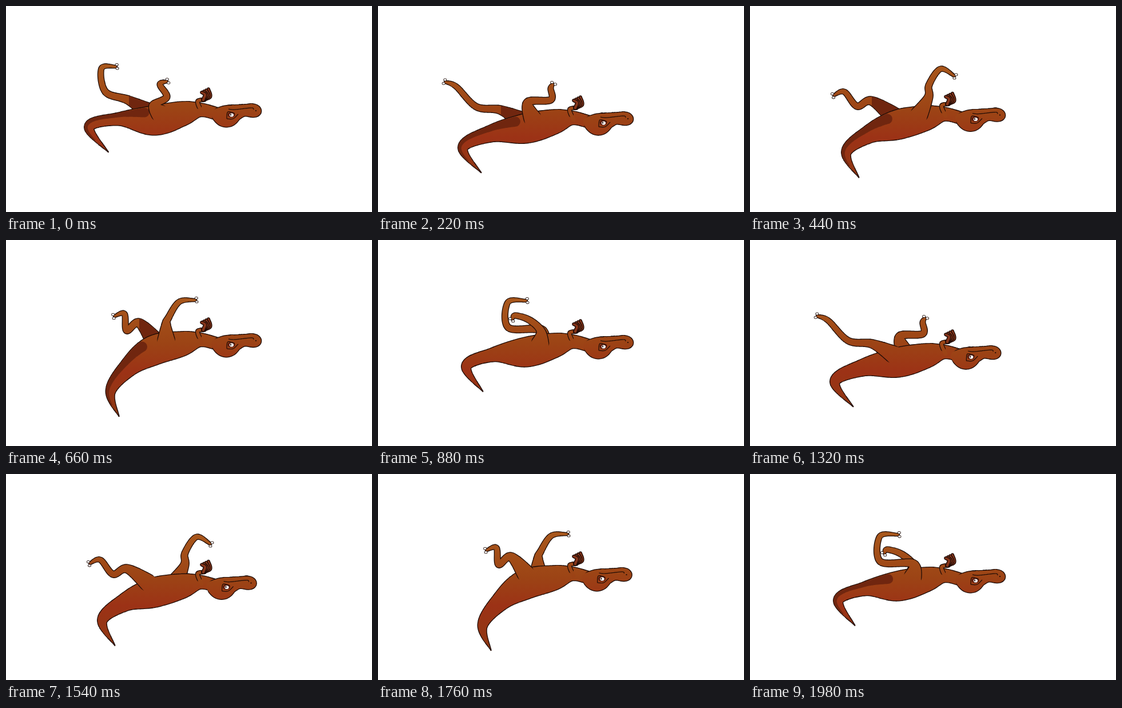
An HTML page with a canvas for the animation above (2.2 s loop, 640 px wide and 360 px high).

```html
<!DOCTYPE html>
<html lang="en">
<head>
<meta charset="utf-8">
<title>Running dinosaur</title>
<style>
html, body { margin: 0; width: 100%; height: 100%; overflow: hidden; background: #fff; }
canvas { display: block; }
</style>
</head>
<body>
<canvas id="stage" width="640" height="360"></canvas>
<script>
const ctx = document.getElementById('stage').getContext('2d');
const STEP = 220, COUNT = 10, HALF = COUNT / 2, DETAIL = 24;
const INK = '#1d0b06', SHADE = '#70260f', HAND = '#86351a';

const skin = ctx.createLinearGradient(0, 100, 0, 300);
skin.addColorStop(0, '#a9581c');
skin.addColorStop(0.4, '#9c4415');
skin.addColorStop(0.65, '#9c3216');
skin.addColorStop(1, '#8f3813');

// Knee, hock, foot and toe over one stride; the far leg is half a cycle behind.
const stride = [
  [[258, 174], [281, 159], [269, 137], [281, 132]],
  [[262, 169], [302, 164], [302, 144], [306, 137]],
  [[312, 160], [313, 138], [333, 110], [357, 122]],
  [[280, 148], [284, 136], [303, 108], [331, 105]],
  [[285, 160], [265, 140], [240, 132], [235, 138]],
  [[215, 165], [174, 150], [167, 109], [192, 106]],
  [[215, 182], [172, 176], [137, 141], [118, 133]],
  [[213, 166], [187, 175], [165, 150], [147, 156]],
  [[233, 145], [211, 158], [207, 129], [190, 133]],
  [[285, 157], [228, 153], [227, 109], [259, 106]]
];
const LEG_RADII = [8, 6, 5, 2.5];

// Periodic motion that repeats with every footfall, twice per loop.
function beat(step, mean, c1, s1, c2, s2) {
  const a = step * 2 * Math.PI / HALF;
  return mean + c1 * Math.cos(a) + s1 * Math.sin(a) + c2 * Math.cos(2 * a) + s2 * Math.sin(2 * a);
}

// Catmull-Rom samples through [x, y, radius] keys.
function spline(keys) {
  const key = i => keys[Math.max(0, Math.min(keys.length - 1, i))];
  const total = (keys.length - 1) * DETAIL;
  return Array.from({ length: total + 1 }, (_, n) => {
    const i = Math.floor(n / DETAIL), t = n / DETAIL - i;
    const [a, b, c, d] = [key(i - 1), key(i), key(i + 1), key(i + 2)];
    return b.map((v, k) => v + t / 2 * (c[k] - a[k]
      + t * (2 * a[k] - 5 * v + 4 * c[k] - d[k] + t * (3 * (v - c[k]) + d[k] - a[k]))));
  });
}

function discs(samples, grow) {
  const path = new Path2D();
  for (const [x, y, r] of samples) {
    const radius = Math.max(0.3, r + grow);
    path.moveTo(x + radius, y);
    path.arc(x, y, radius, 0, 2 * Math.PI);
  }
  return path;
}

// A tapered limb; the first `open` samples blend into what lies below.
function limb(samples, fill = skin, open = 0) {
  const inside = discs(samples, -0.7);
  ctx.fillStyle = INK;
  ctx.fill(discs(samples.slice(open), 0.6));
  ctx.fillStyle = fill;
  ctx.fill(inside);
  return inside;
}

function spot(x, y, rx, ry, fill) {
  ctx.beginPath();
  ctx.ellipse(x, y, rx, ry, 0, 0, 2 * Math.PI);
  ctx.fillStyle = fill;
  ctx.fill();
}

function line(...keys) {
  ctx.beginPath();
  spline(keys).forEach(([x, y]) => ctx.lineTo(x, y));
  ctx.strokeStyle = INK;
  ctx.lineWidth = 1.2;
  ctx.stroke();
}

function drawLeg(joints, bob, open, shaded) {
  const [kneeX] = joints[0], [toeX, toeY] = joints[3];
  const hip = [275 + 0.3 * (kneeX - 262), 192 + bob, 18];
  const inside = limb(spline([hip, ...joints.map((p, i) => [...p, LEG_RADII[i]])]), skin, open);
  if (shaded) {
    ctx.save();
    ctx.clip(inside);
    ctx.fillStyle = SHADE;
    ctx.fillRect(kneeX, 0, 200, 360);
    ctx.restore();
  }
  const angle = Math.atan2(toeY - joints[2][1], toeX - joints[2][0]);
  for (const side of [-1, 1]) {
    const x = toeX + 4 * Math.cos(angle + side), y = toeY + 4 * Math.sin(angle + side);
    spot(x, y, 3, 2.5, INK);
    spot(x, y, 2.2, 1.7, '#fff');
  }
}

function drawBody(step, bob, shaded) {
  const bendX = beat(step, 160, -18.1, -5.7, 3.6, 4.1);
  const bendY = beat(step, 239.6, -25.9, 8.1, -2.7, 9.5);
  const hip = [258, 200 + bob, 26];
  const samples = spline([
    [bendX + 26 + (160 - bendX) / 2, bendY + 44, 0.6],
    [bendX, bendY, 9],
    [(bendX + hip[0]) / 2 - 4, (bendY + hip[1]) / 2 - 8, 13.5 + (bendY - 230) / 10],
    hip,
    [305, 189 + bob, 22],
    [338, 181.5 + bob, 12.5],
    [368, 188 + bob, 11]
  ]);
  limb(samples);
  if (!shaded) return;
  // The shadow hugs the outer side of the tail.
  const tail = samples.slice(DETAIL / 2, 3 * DETAIL - 6);
  const band = tail.slice(1).map(([x, y, r], i) => {
    const dx = x - tail[i][0], dy = y - tail[i][1], k = 0.6 * r / Math.hypot(dx, dy);
    return [x + dy * k, y - dx * k, 0.4 * r];
  });
  ctx.fillStyle = SHADE;
  ctx.fill(discs(band, -0.7));
}

function drawHead() {
  limb(spline([
    [368, 189, 10], [385, 193, 19], [400, 187, 14],
    [416, 182.5, 10.5], [434, 183, 11.5], [442, 185, 3]
  ]), skin, DETAIL / 2);
  spot(394, 190, 6.5, 5, '#5c1b0d');
  spot(394.5, 190.5, 3.6, 3.1, '#fff');
  spot(393, 190, 1, 1.8, INK);
  line([386, 197], [388, 185], [400, 188]);
  line([386, 197], [397, 197], [406, 189]);
  line([389, 180], [400, 181], [429, 178], [433, 181]);
  spot(437, 183, 1.2, 1, INK);
}

function drawArm() {
  limb(spline([[342, 185, 4], [335, 167, 3.5], [347, 164, 3]]), skin, DETAIL / 2);
  for (let i = 0; i < 4; i++) {
    limb(spline([[345, 164, 3], [357 - 3 * i, 158 - i, 2.8], [354 - 4 * i, 145 + 2 * i, 2.2]]), HAND);
  }
}

function shifted(dx, dy, drawPart) {
  ctx.save();
  ctx.translate(dx, dy);
  drawPart();
  ctx.restore();
}

function draw(step) {
  const bob = beat(step, 2.1, 1.1, 10.3, -3.2, -1.3);
  const tuck = 18 * Math.max(0, Math.cos(2 * Math.PI * (step - 6.6) / COUNT) - 0.5);
  const shaded = (step + 1) % COUNT < HALF;
  ctx.fillStyle = '#fff';
  ctx.fillRect(0, 0, 640, 360);
  drawLeg(stride[(step + HALF) % COUNT], bob, 0, shaded);
  drawBody(step, bob, shaded);
  drawLeg(stride[step], bob, DETAIL / 3, false);
  shifted(-tuck, bob, drawHead);
  shifted(0, bob, drawArm);
}

function tick() {
  draw(Math.floor(performance.now() / STEP) % COUNT);
  requestAnimationFrame(tick);
}
tick();
</script>
</body>
</html>
```
